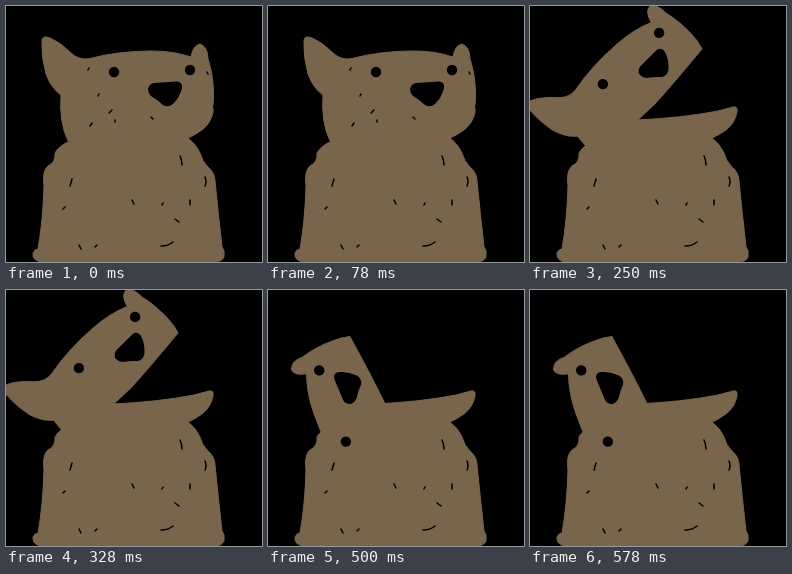
These frames come from a looping animation (256 by 256 pixels, 0.63 s). An HTML page:

```html
<!DOCTYPE html>
<html lang="en">
<head>
<meta charset="utf-8">
<title>Bear tipping its head back</title>
<style>
  html, body { margin: 0; height: 100%; overflow: hidden; background: #000; }
  svg { display: block; width: 100vw; height: 100vh; }
  .fur { fill: #78654c; stroke: #78654c; }
  .marks { fill: none; stroke: #000; stroke-width: 1.5; stroke-linecap: round; }
</style>
</head>
<body>
<svg viewBox="0 0 256 256">
  <!-- body and lower jaw -->
  <path class="fur" d="M106 114 Q152 112 188 105 L203 101 Q208 100 207 106 Q205 117 196 124
    Q189 129 182 132 Q190 138 194 147 Q196 155 202 161 Q209 167 209 175 Q212 205 216 241
    Q219 244 218 251 Q216 256 208 256 H36 Q26 255 27 247 Q29 243 32 243 Q37 215 38 180
    Q36 165 42 160 Q50 156 49 147 Q53 140 62 136 Q90 130 106 114Z"/>

  <!-- upper head -->
  <g id="head">
    <path class="fur" d="M36 34 Q37 29 44 32 Q54 36 64 46 Q73 55 84 52.5 Q112 45 145 45
      Q168 45 185 51 Q187 39 194 38 Q202 41 202 53 Q207 68 207.5 86 Q208 96 206 104
      Q165 111 134 115 L106 116 V135 L62 135 Q53 116 55 89 Q45 82 40 68 Q35 50 36 34Z"/>
    <circle cx="108" cy="66" r="5.2"/>
    <circle cx="184" cy="64" r="5.2"/>
    <path d="M142 83 Q143 78 148 77 L171 75.5 Q177 76 176 82 Q174 91 167 98 Q162 102 157 99
      Q152 94 145 90 Q142 87 142 83Z"/>
  </g>

  <path class="marks" d="M174 150 q2 4 2 9 M199 171 q2 5 0 9 M66 173 l-2 7 M57 203 l2 -2
    M126 194 l2 4 M184 194 v5 M169 213 l4 3 M155 240 q7 0 12 -4 M73 239 l2 4 M89 241 l2 -2 M156 199 l1 -2"/>
  <path id="creases" class="marks" d="M82 64 l1 -2 M103 107 l3 -3 M84 120 l2 -3 M109 114 v2
    M145 111 l2 2 M201 66 l1 2 M92 90 l1 -2"/>
</svg>
<script>
  // Each pose: start time (ms), midpoint between the eyes, head angle (degrees)
  const poses = [
    [0, 146, 65, 0],
    [130, 128, 46.5, -17.6],
    [250, 101, 52.5, -40.8],
    [380, 75.5, 75.5, -72.5],
    [500, 64.5, 116, -109]
  ];
  const LOOP = 630;
  const head = document.getElementById('head');
  const creases = document.getElementById('creases');
  const start = performance.now();

  function draw(now) {
    const time = Math.max(0, now - start) % LOOP;
    const [begin, x, y, angle] = poses.findLast(pose => pose[0] <= time);
    head.setAttribute('transform', `translate(${x} ${y}) rotate(${angle}) translate(-146 -65)`);
    creases.setAttribute('visibility', begin === 0 ? 'visible' : 'hidden');
    requestAnimationFrame(draw);
  }
  draw(start);
</script>
</body>
</html>
```
